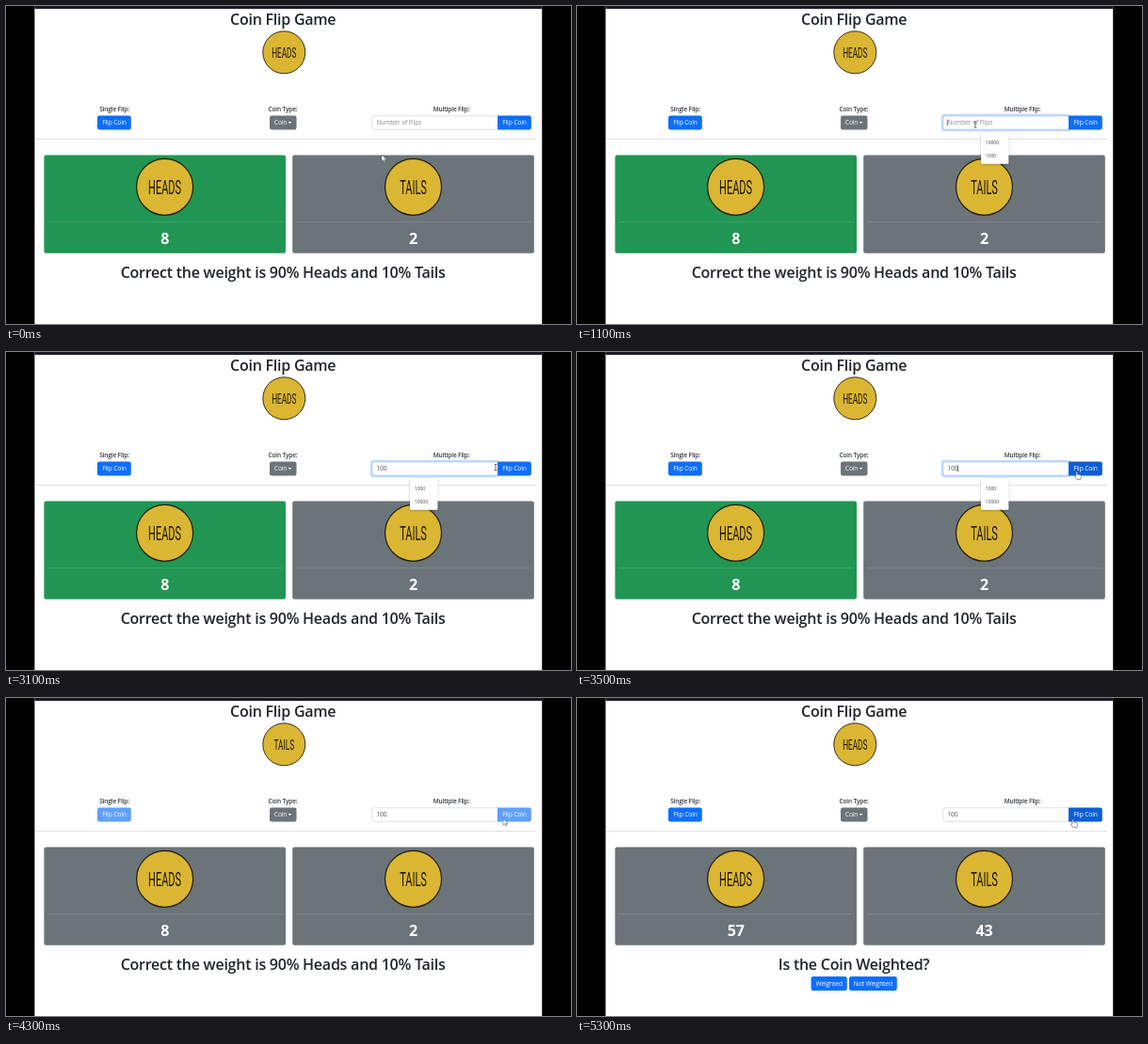
These frames come from a looping animation (600 by 338 pixels, 5.4 s). An HTML page:

```html
<!DOCTYPE html>
<html lang="en">
<head>
<meta charset="utf-8">
<title>Coin Flip Game</title>
<style>
  html, body { margin: 0; width: 100%; height: 100%; overflow: hidden; background: #000; }
  svg { display: block; width: 100vw; height: 100vh; }
  text { font: 500 6.7px "Open Sans", "Noto Sans", sans-serif; letter-spacing: -.02em; fill: #212529; }
  .mid { text-anchor: middle; }
  text.label { font-size: 6.5px; font-weight: 600; fill: #33373b; }
  text.big { font-size: 16px; font-weight: 550; letter-spacing: -.015em; }
  text.count { font-weight: 700; }
  text.white { fill: #fff; }
  text.item { font-size: 5px; letter-spacing: 0; fill: #444; }
  text.face { font: 400 20px Roboto, sans-serif; letter-spacing: 0; fill: #1c180a; }
  .blue { fill: #0d6efd; }
  .gray { fill: #6b7479; }
</style>
</head>
<body>
<svg viewBox="0 0 600 338" preserveAspectRatio="none">
  <defs>
    <filter id="shadow" x="-20%" y="-20%" width="140%" height="150%">
      <feDropShadow dx="0" dy=".6" stdDeviation=".8" flood-opacity=".3"/>
    </filter>
  </defs>

  <rect width="600" height="338"/>
  <rect x="30.4" width="538.8" height="338" fill="#fefefe"/>
  <rect x="30.4" width="538.8" height="3" fill="#1b1a26"/>

  <text class="big mid" x="294.2" y="20">Coin Flip Game</text>
  <g id="mainCoin"></g>

  <text class="label mid" x="115" y="111.5">Single Flip:</text>
  <text class="label mid" x="294" y="111.5">Coin Type:</text>
  <text class="label mid" x="473" y="111.5">Multiple Flip:</text>

  <g id="single">
    <rect class="blue" x="97" y="116.5" width="35.8" height="15" rx="2.2"/>
    <text class="white mid" x="115" y="126.4">Flip Coin</text>
  </g>

  <rect class="gray" x="280" y="116.5" width="28.5" height="15" rx="2.2"/>
  <text class="white" x="284.8" y="126.4">Coin</text>
  <path d="M299.6 123.1h3.8l-1.9 2z" fill="#fff"/>

  <path d="M31 141.5H563" stroke="#d9dadc" stroke-width=".8"/>

  <rect id="ring" x="387.7" y="115.7" width="135.2" height="16.6" rx="2.8" fill="none" stroke="#c2dbfe" stroke-width="1.8"/>
  <path id="field" d="M522.5 116.8H391a2.2 2.2 0 0 0-2.2 2.2v10a2.2 2.2 0 0 0 2.2 2.2h131.5z" fill="#fff" stroke-width=".7"/>
  <text id="value" x="393.4" y="126.4"></text>
  <path id="caret" stroke="#222" stroke-width=".6"/>
  <g id="multi">
    <path id="multiBox" d="M522 116.5h33.6a2.2 2.2 0 0 1 2.2 2.2v10.6a2.2 2.2 0 0 1-2.2 2.2H522z"/>
    <text class="white mid" x="540" y="126.4">Flip Coin</text>
  </g>

  <rect id="headsCard" x="40.4" y="158.5" width="256.6" height="104.2" rx="2"/>
  <rect class="gray" x="304.2" y="158.5" width="256.6" height="104.2" rx="2"/>
  <path d="M44 229.7H293.5M308 229.7H557.5" stroke="#fff" stroke-opacity=".2" stroke-width=".7"/>
  <g id="headsCoin"></g>
  <g id="tailsCoin"></g>
  <text id="headsCount" class="big count white mid" x="168.7" y="252.8"></text>
  <text id="tailsCount" class="big count white mid" x="432.4" y="252.8"></text>

  <text id="message" class="big mid" x="294.1" y="289.2"></text>
  <g id="answers">
    <rect class="blue" x="248.6" y="296" width="38.2" height="15" rx="2.2"/>
    <text class="white mid" x="267.7" y="305.9">Weighted</text>
    <rect class="blue" x="289" y="296" width="50.8" height="15" rx="2.2"/>
    <text class="white mid" x="314.4" y="305.9">Not Weighted</text>
  </g>

  <g id="popup">
    <rect x="429" y="134.5" width="29.3" height="33.3" rx=".8" fill="#fff" filter="url(#shadow)"/>
    <text id="item1" class="item" x="433.8" y="146.5"></text>
    <text id="item2" class="item" x="433.8" y="161"></text>
  </g>

  <g id="cursor">
    <path id="arrow" d="M0 0V7.2L1.7 5.7 2.8 8.2 3.9 7.7 2.8 5.3H5z" fill="#fff" stroke="#444" stroke-width=".5"/>
    <path id="beam" d="M-1.4-3H1.4M0-3V3M-1.4 3H1.4" fill="none" stroke="#333" stroke-width=".7"/>
    <path id="hand" d="M0 .6Q.7-.5 1.4.6V3L5 3.8Q5.7 4.1 5.5 5.2L4.8 8.6H1L-1.6 5.2Q-1.4 4.2 0 5z" fill="#fff" stroke="#333" stroke-width=".5"/>
  </g>
</svg>

<script>
const LOOP = 5400, STEP = 100;
const FOCUS = 700, POPUP = 900, HOVER = 3300, CLICK = 3600, RESULT = 4600;
const typed = [[1300, "1"], [1700, "10"], [2200, "100"]];
const path = [
  [0, 399, 158], [100, 400, 156], [600, 423, 126], [2300, 423, 126],
  [2800, 518, 123], [3100, 520, 122.5], [3400, 530, 127],
  [3600, 530, 127], [4300, 528, 128], [4600, 526, 129], [LOOP, 526, 129]
];

const el = id => document.getElementById(id);
const show = (id, on) => el(id).setAttribute("visibility", on ? "visible" : "hidden");
const set = (id, name, v) => el(id).setAttribute(name, v);
const write = (id, s) => { if (el(id).textContent !== s) el(id).textContent = s; };

function makeCoin(id, x, y, scale, face) {
  el(id).innerHTML = `<g transform="translate(${x} ${y}) scale(${scale})">
    <circle r="30" fill="#dbb632" stroke="#1f1b0e" stroke-width="1.2"/>
    <text class="face mid" transform="scale(.55 1)" y="7.2">${face}</text></g>`;
}

function cursorAt(t) {
  const i = path.findIndex((p, k) => t >= p[0] && t < path[k + 1][0]);
  const [t0, x0, y0] = path[i], [t1, x1, y1] = path[i + 1];
  const u = (t - t0) / (t1 - t0), e = u * u * (3 - 2 * u);
  return [x0 + (x1 - x0) * e, y0 + (y1 - y0) * e];
}

function render(t) {
  const flipping = t >= CLICK && t < RESULT, done = t >= RESULT;
  const focused = t >= FOCUS && t < CLICK;
  const entry = typed.filter(k => t >= k[0]).pop();
  const value = entry ? entry[1] : "";

  show("ring", focused);
  set("field", "stroke", focused ? "#86b7fe" : "#ced4da");
  write("value", value || "Number of Flips");
  el("value").style.fill = value ? "#495057" : "#858c93";

  const blink = t - (entry ? entry[0] : FOCUS);
  show("caret", focused && blink % 1000 < 500);
  set("caret", "d", `M${393.3 + value.length * 3.75} 120.5v7`);

  show("popup", t >= POPUP && t <= CLICK);
  set("popup", "opacity", t < CLICK ? 1 : .15);
  write("item1", value ? "1000" : "10000");
  write("item2", value ? "10000" : "1000");

  const hovered = t >= HOVER && t < CLICK || done;
  set("multiBox", "fill", t === CLICK ? "#0a58ca" : hovered ? "#0b5ed7" : "#0d6efd");
  for (const id of ["single", "multi"]) set(id, "opacity", flipping ? .65 : 1);

  set("headsCard", "fill", t < CLICK ? "#219653" : "#6b7479");
  write("headsCount", done ? "57" : "8");
  write("tailsCount", done ? "43" : "2");
  write("message", done ? "Is the Coin Weighted?" : "Correct the weight is 90% Heads and 10% Tails");
  show("answers", done);

  const face = flipping ? "TAILS" : "HEADS";
  if (render.face !== face) makeCoin("mainCoin", 295.3, 49.3, .75, render.face = face);

  const [x, y] = cursorAt(t);
  const shape = flipping || y > 132 ? "arrow" : x > 522 ? "hand" : "beam";
  set("cursor", "transform", `translate(${x} ${y})`);
  for (const s of ["arrow", "beam", "hand"]) show(s, s === shape);
}

makeCoin("headsCoin", 168.6, 192.3, 1, "HEADS");
makeCoin("tailsCoin", 432.5, 192.3, 1, "TAILS");

const start = performance.now();
function tick() {
  const t = (performance.now() - start) % LOOP;
  render(Math.floor(t / STEP) * STEP);
  requestAnimationFrame(tick);
}
tick();
</script>
</body>
</html>
```
